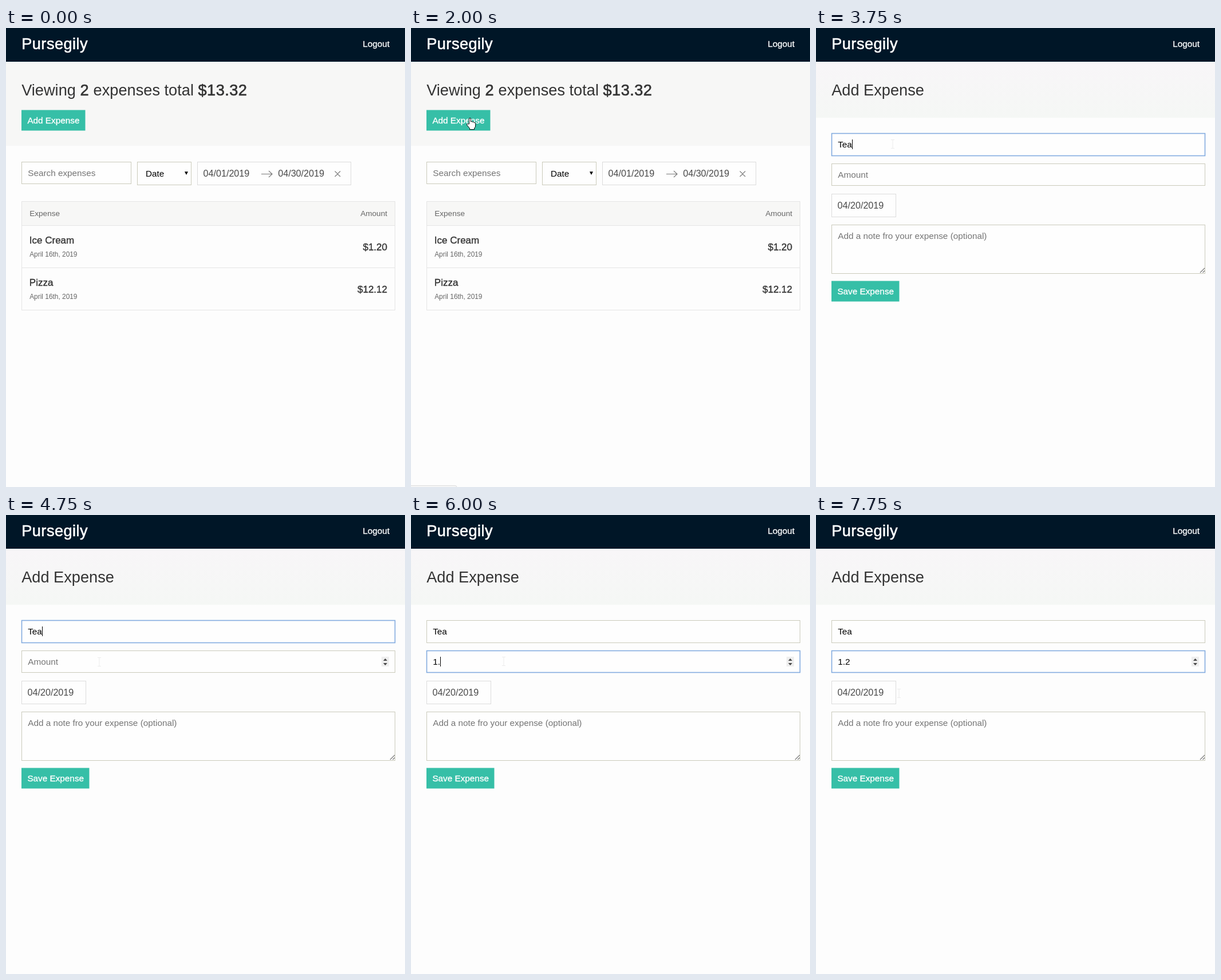
Write an HTML page that moves like this. It is 697 by 803 pixels and loops after 8 s.

```html
<!DOCTYPE html>
<html lang="en">
<head>
<meta charset="utf-8">
<title>Expense tracker</title>
<style>
  html, body { margin: 0; width: 100%; height: 100%; overflow: hidden; background: #fdfdfd; }
  svg { display: block; width: 100%; height: 100%; }
  text { font: 15.3px "Liberation Sans", Arial, sans-serif; fill: #333; white-space: pre; }
  .title { font-size: 27.2px; }
  .medium { stroke: #333; stroke-width: .022em; }
  .title .medium, .title.medium { letter-spacing: .017em; }
  .white { fill: #fff; stroke: #fff; }
  .hint { fill: #757575; }
  .head { font-size: 13.6px; fill: #666; }
  .row { font-size: 17px; }
  .small { font-size: 11.9px; fill: #666; }
  .date { font-size: 16.15px; fill: #484848; }
  .typed { fill: #000; }
  .end { text-anchor: end; }
  .button { fill: #36bfa7; }
  .box { fill: #fefefe; stroke: #cacabb; }
  .pale { stroke: #dcdcdc; }
  .focus { stroke: #82abdf; stroke-width: 1.6; }
  .line { fill: none; stroke: #e5e5e5; }
  .icon { fill: none; stroke: #777; stroke-width: 1.1; }
  .pointer { fill: #fff; stroke: #000; stroke-linejoin: round; }
</style>
</head>
<body>
<svg id="stage" viewBox="0 0 697 803" preserveAspectRatio="none">
  <defs>
    <linearGradient id="band" x2="0" y2="1">
      <stop stop-color="#f8f6f8"/><stop offset="1" stop-color="#f5f7f5"/>
    </linearGradient>
  </defs>
  <rect width="697" height="803" fill="#fdfdfd"/>
  <g id="list"></g>
  <g id="form"></g>
  <rect width="697" height="59" fill="#001627"/>
  <text class="title medium white" x="27.2" y="37">Pursegily</text>
  <text class="medium white end" x="670" y="33">Logout</text>
  <rect id="status" x="-4" y="800.5" width="84" height="12" rx="3" fill="#f6f6f6" stroke="#ddd"/>
  <g id="cursor">
    <path id="arrow" class="pointer" d="M.5 .5V14L3.6 11.2 6 16.4 8.2 15.4 5.9 10.4H10Z"/>
    <path id="hand" class="pointer" d="M-1.5 11V2Q-1.5 .5 0 .5T1.5 2V7Q3.8 5.6 4.5 7.6Q6.8 6.5 7.3 8.5Q9.7 8 9.7 10.5V14Q9.5 17 7.7 18V20.5H-.5V18.5L-5.3 12.8Q-6 10.8-4.3 10.7Z"/>
    <path id="beam" d="M-3-7.5H3M-3 7.5H3M0-7.5V7.5" fill="none" stroke="#ececec"/>
  </g>
</svg>
<script>
const LOOP = 8000;
const $ = id => document.getElementById(id);
const text = (x, y, content, cls = "", id = "") =>
  `<text x="${x}" y="${y}" class="${cls}" id="${id}">${content}</text>`;
const box = (x, y, w, h, cls = "box", id = "") =>
  `<rect x="${x + .5}" y="${y + .5}" width="${w - 1}" height="${h - 1}" class="${cls}" id="${id}"/>`;
const button = (x, y, w, label) =>
  `<rect x="${x}" y="${y}" width="${w}" height="36" class="button"/>` +
  text(x + 10.4, y + 23.5, label, "medium white");
const expense = (y, name, amount) =>
  text(40.8, y, name, "row medium") +
  text(41.2, y + 22.5, "April 16th, 2019", "small") +
  text(666, y + 11.5, amount, "row medium end");

$("list").innerHTML =
  `<rect y="59" width="697" height="147" fill="#f7f7f6"/>` +
  text(27.2, 118, `Viewing <tspan class="medium">2</tspan> expenses total <tspan class="medium">$13.32</tspan>`, "title") +
  button(27, 143.5, 111.5, "Add Expense") +
  box(27, 234, 192, 39) + text(38.2, 258.5, "Search expenses", "hint") +
  box(229, 234, 95, 41) + text(244, 260, "Date", "typed") +
  `<path d="M312 251.3H318L315 257Z"/>` +
  box(334, 234, 269, 41, "box pale") +
  text(344.5, 260, "04/01/2019", "date") + text(475.2, 260, "04/30/2019", "date") +
  `<path class="icon" d="M446 255.5H465M459 250L465 255.5 459 261M574.5 250.5L584 260M584 250.5L574.5 260"/>` +
  `<rect x="27" y="303" width="653" height="43" fill="#f7f7f6"/>` +
  box(27, 303, 653, 191, "line") +
  `<path class="line" d="M27 345.5H680M27 419.5H680"/>` +
  text(41.2, 329, "Expense", "head") + text(666, 329, "Amount", "head end") +
  expense(377, "Ice Cream", "$1.20") + expense(451, "Pizza", "$12.12");

$("form").innerHTML =
  `<rect y="59" width="697" height="98" fill="url(#band)"/>` +
  text(27.2, 118, "Add Expense", "title") +
  box(27, 184, 653, 40, "box", "nameBox") + text(38.2, 209, "", "", "name") +
  box(27, 237, 653, 39, "box", "amountBox") + text(38.2, 262, "", "", "amount") +
  `<g id="spinner"><rect x="656" y="248" width="13" height="17" fill="#eee"/>
   <path d="M659 255L662.5 251 666 255ZM659 259L662.5 263 666 259Z" fill="#444"/></g>` +
  box(27, 290, 113, 41, "box pale") + text(37.5, 316, "04/20/2019", "date") +
  box(27, 344, 653, 86) + text(38.2, 369, "Add a note fro your expense (optional)", "hint") +
  `<path class="icon" d="M671 428L679 420M675.5 428L679 424.5"/>` +
  button(27, 442.5, 118.5, "Save Expense") +
  `<rect id="caret" width="1" height="17"/>`;

// Each step lists only what changes at its time.
const steps = [
  [0, { page: "list", status: false, cursor: null, name: "", amount: "", focus: "name", caret: false, spinner: false }],
  [750, { cursor: ["arrow", 190, 274] }],
  [1000, { cursor: ["beam", 150, 252] }],
  [1250, { cursor: ["hand", 118, 170], status: true }],
  [1500, { cursor: ["hand", 107, 161] }],
  [1750, { cursor: ["hand", 104, 158] }],
  [2000, { cursor: ["hand", 103, 157] }],
  [2250, { page: "form", cursor: ["arrow", 97, 157], caret: true }],
  [2500, { cursor: ["arrow", 107, 169], status: false }],
  [2750, { cursor: ["beam", 128, 198], caret: false }],
  [3000, { cursor: ["beam", 134, 203] }],
  [3250, { name: "T", caret: true }],
  [3500, { name: "Te" }],
  [3750, { name: "Tea" }],
  [4250, { caret: false }],
  [4500, { cursor: ["beam", 155, 246], spinner: true }],
  [4750, { cursor: ["beam", 163, 257], caret: true }],
  [5000, { focus: "amount" }],
  [5250, { cursor: ["beam", 162, 256] }],
  [5500, { caret: false }],
  [6000, { amount: "1.", caret: true }],
  [6500, { caret: false }],
  [6750, { amount: "1.2", caret: true }],
  [7250, { cursor: ["beam", 155, 280], caret: false }],
  [7500, { cursor: ["beam", 147, 306] }],
  [7750, { cursor: ["beam", 145, 312] }]
];
const hints = { name: "Description", amount: "Amount" };
const show = (id, on) => $(id).setAttribute("visibility", on ? "inherit" : "hidden");

function draw(state) {
  for (const page of ["list", "form"]) show(page, state.page === page);
  for (const field in hints) {
    const value = state[field];
    $(field).textContent = value || hints[field];
    $(field).setAttribute("class", value ? "typed" : "hint");
    $(field + "Box").setAttribute("class", state.focus === field ? "box focus" : "box");
  }
  const field = $(state.focus);
  const width = state[state.focus] ? field.getComputedTextLength() : 0;
  $("caret").setAttribute("x", Math.round(38 + width));
  $("caret").setAttribute("y", field.getAttribute("y") - 14);
  for (const id of ["caret", "spinner", "status"]) show(id, state[id]);

  const [shape, x, y] = state.cursor || ["", 0, 0];
  for (const id of ["arrow", "hand", "beam"]) show(id, id === shape);
  $("cursor").setAttribute("transform", `translate(${x} ${y})`);
}

let shown = -1;
function tick() {
  const time = performance.now() % LOOP;
  const past = steps.filter(([at]) => at <= time);
  if (past.length !== shown) {
    shown = past.length;
    draw(Object.assign({}, ...past.map(([, change]) => change)));
  }
  requestAnimationFrame(tick);
}
tick();
</script>
</body>
</html>
```
